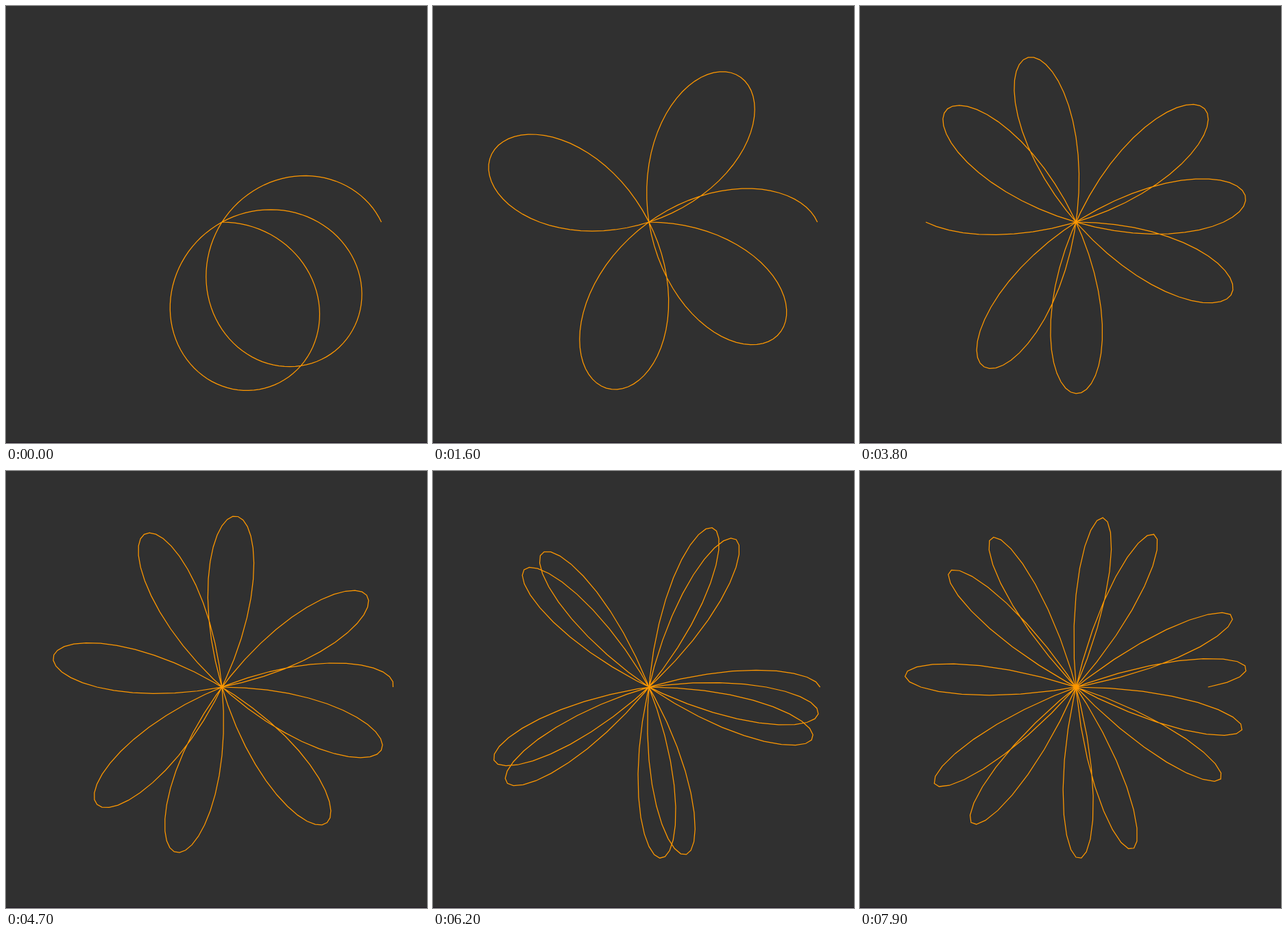
Recreate the animation shown at these times as an HTML page with a canvas. Size 614 by 637 pixels, loop 8000 ms.

```html
<!DOCTYPE html>
<html>
<head>
<meta charset="utf-8">
<title>Rose curve</title>
<style>
html, body { margin: 0; width: 100%; height: 100%; overflow: hidden; background: #303030; }
canvas { display: block; }
</style>
</head>
<body>
<canvas id="stage" width="614" height="637"></canvas>
<script>
const LOOP = 8000, TICK = 100;
const CENTER = 315, RADIUS = 250, SEGMENTS = 200;

// Petal factor k at given ticks; linear in between.
const keys = [[0, 1.19], [16, 2.22], [27, 2.95], [38, 3.67], [55, 4.78], [69, 5.70], [79, 6.36]];
const ctx = document.getElementById('stage').getContext('2d');

function petalFactor(tick) {
  const i = Math.max(1, keys.findIndex(([t]) => t >= tick));
  const [t0, k0] = keys[i - 1], [t1, k1] = keys[i];
  const k = k0 + (k1 - k0) * (tick - t0) / (t1 - t0);
  return Math.round(k * 100) / 100;
}

function drawRose(k) {
  ctx.fillStyle = '#303030';
  ctx.fillRect(0, 0, 614, 637);
  ctx.fillStyle = '#231b29';
  ctx.fillRect(0, 636, 614, 1);

  ctx.beginPath();
  for (let i = 0; i <= SEGMENTS; i++) {
    const a = 2 * Math.PI * i / SEGMENTS;
    const r = RADIUS * Math.sin(k * a);
    ctx.lineTo(CENTER + r * Math.cos(a), CENTER + r * Math.sin(a));
  }
  ctx.strokeStyle = '#ff9800';
  ctx.lineWidth = 1.25;
  ctx.stroke();
}

const start = performance.now();
function frame() {
  const time = (performance.now() - start) % LOOP;
  drawRose(petalFactor(Math.floor(time / TICK)));
  requestAnimationFrame(frame);
}
frame();
</script>
</body>
</html>
```
